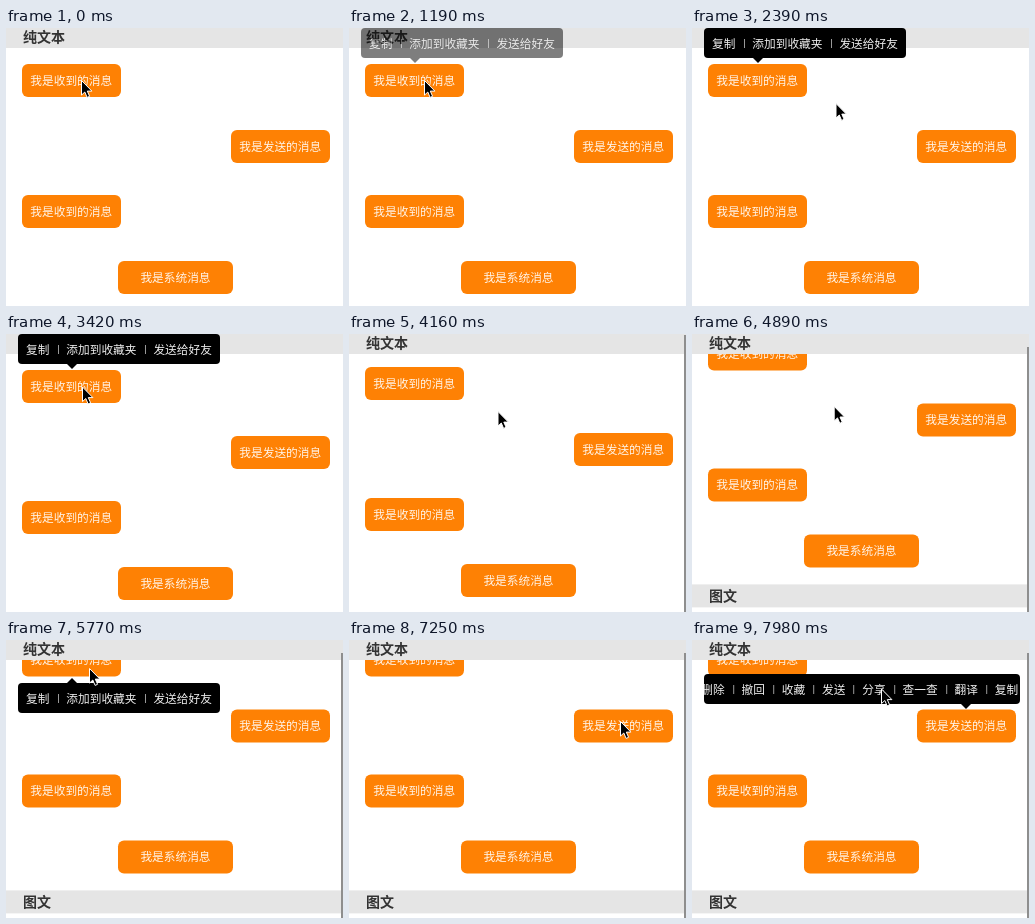
Write an HTML page that moves like this. It is 337x278 px and loops after 8000 ms.

```html
<!DOCTYPE html>
<html lang="zh-CN">
<head>
<meta charset="utf-8">
<style>
html, body { margin: 0; width: 100%; height: 100%; overflow: hidden; background: #fff; }
body { position: relative; font: 11.7px "Noto Sans CJK SC", "Noto Sans CJK", sans-serif; }
div, svg { position: absolute; white-space: nowrap; }
#view { left: 0; top: 20px; width: 337px; height: 258px; overflow: hidden; }
#list { left: 0; top: -20px; width: 337px; }
.msg { width: 98.5px; height: 33px; line-height: 32px; border-radius: 6px; background: #fe8104; color: #fff4e8; text-align: center; }
.head { left: 0; width: 320px; height: 23px; padding-left: 17px; line-height: 23px; background: #e5e5e5; color: #333; font-size: 14px; font-weight: 700; }
#bar { left: 335px; width: 2px; height: 300px; background: #8e8e8e; }
.menu { height: 30px; color: #eee; }
.items { left: 0; top: 0; width: 100%; height: 30px; overflow: hidden; border-radius: 4px; background: #000; }
.row { display: flex; left: 0; height: 30px; line-height: 30px; align-items: center; }
.row span { padding: 0 8.1px; }
.row i { width: .7px; height: 9px; background: #999; }
.tip { width: 0; border: 5px solid transparent; margin-left: -5px; }
.down { top: 30px; border-top-color: #000; }
.up { bottom: 30px; border-bottom-color: #000; }
#cursor { left: 0; top: 0; overflow: visible; }
</style>
</head>
<body>
<div id="view"><div id="list"><div class="head" style="top:282.7px">图文</div></div></div>
<div class="head" style="top:-3px">纯文本</div>
<div id="bar"></div>
<svg id="cursor" width="12" height="19"><path d="M0 0V14.6L3.3 11.5L5.6 16.9L8.1 15.8L5.8 10.6H10.4Z" fill="#000" stroke="#fff"/></svg>
<script>
const $ = id => document.getElementById(id);
const LOOP = 8000, START = 1190, STEP = 147.6;

const clamp = v => Math.max(0, Math.min(1, v));
const ease = (k, from, to) => {
  const u = clamp((k - from) / (to - from));
  return u * u * (3 - 2 * u);
};

function addMessage(kind, row) {
  const el = document.createElement('div');
  el.className = 'msg';
  el.textContent = `我是${kind}消息`;
  el.style.top = 36.2 + 65.6 * row + 'px';
  el.style.left = { 收到的: 16, 发送的: 225, 系统: 112 }[kind] + 'px';
  if (kind === '系统') el.style.width = '115px';
  $('list').append(el);
}
['收到的', '发送的', '收到的', '系统'].forEach(addMessage);

function addMenu(y, w, tipX, dir, labels, ...shown) {
  const el = document.createElement('div');
  el.className = 'menu';
  el.style.cssText = `left:12px;top:${y}px;width:${w}px`;
  el.innerHTML = `<div class="items"><div class="row"><span>${labels.split(' ').join('</span><i></i><span>')}</span></div></div>
    <div class="tip ${dir}" style="left:${tipX - 12}px"></div>`;
  document.body.insertBefore(el, $('cursor'));
  return { el, shown };
}

const short = '复制 添加到收藏夹 发送给好友';
const long = '删除 撤回 收藏 发送 分享 查一查 翻译 复制';
const menus = [
  addMenu(0, 202, 66, 'down', short, [0, 11], [14, 20]),
  addMenu(43, 202, 66, 'up', short, [30, 37]),
  addMenu(34, 316, 274, 'down', long, [42, 99])
];
const fade = (k, [open, closed]) => clamp(Math.min(k - open + 1, closed - k) / 2);

// Pointer moves: start, end, x, y
const moves = [
  [0, 0, 75.5, 52.5], [3, 8, 144, 75.5], [10, 12.5, 76.5, 53], [16, 20, 149, 77.5],
  [24, 29, 83.5, 28.5], [32, 36, 140, 122], [36, 40, 271.5, 81.5], [43, 46, 189.5, 49]
];
const pointer = (k, axis) => moves.reduce(
  (p, m) => p + (m[axis] - p) * ease(k, m[0], m[1]), moves[0][axis]);

function draw(t) {
  const k = Math.floor((t - START) / STEP);
  const y = 32.6 * ease(k, 19, 24.25);
  $('list').style.transform = `translateY(${-y}px)`;
  $('bar').style.top = y * .4 + 'px';
  $('bar').style.opacity = y ? 1 : 0;
  $('cursor').style.transform = `translate(${pointer(k, 2)}px,${pointer(k, 3)}px)`;
  for (const m of menus) m.el.style.opacity = Math.max(...m.shown.map(s => fade(k, s)));
  menus[2].el.querySelector('.row').style.transform = `translateX(${-10.8 * ease(k, 45, 46)}px)`;
}

moves[0][0] = -1;
const t0 = performance.now();
function frame() {
  draw((performance.now() - t0) % LOOP);
  requestAnimationFrame(frame);
}
frame();
</script>
</body>
</html>
```
